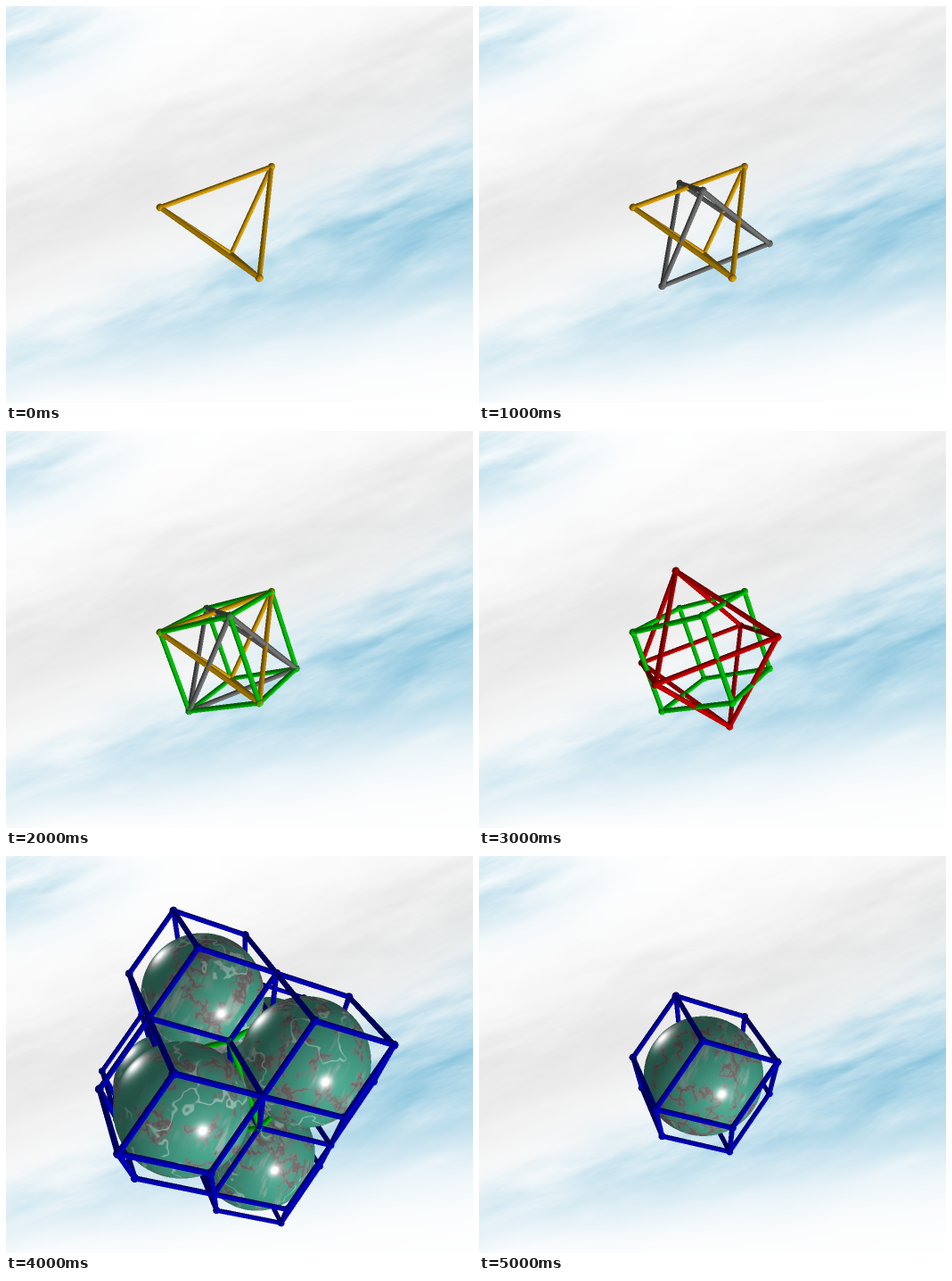
Recreate the animation shown at these times as an HTML page with a canvas. Size 524 px wide and 445 px high, loop 5.5 s.

```html
<!DOCTYPE html>
<html lang="en">
<head>
<meta charset="utf-8">
<title>Packed spheres and polyhedra</title>
<style>
html, body { margin: 0; width: 100%; height: 100%; overflow: hidden; background: #fff; }
canvas { display: block; }
</style>
</head>
<body>
<canvas id="stage" width="524" height="445"></canvas>
<script>
const W = 524, H = 445, SS = 2, SLOT = 500;
const ctx = document.getElementById('stage').getContext('2d');
const clamp = v => Math.max(0, Math.min(1, v));
const smooth = (a, b, v) => { v = clamp((v - a) / (b - a)); return v * v * (3 - 2 * v); };
const mix = (a, b, t) => a.map((v, i) => v + (b[i] - v) * t);
const dot = (a, b) => a[0] * b[0] + a[1] * b[1] + a[2] * b[2];

// Smooth 3D value noise in 0..1
function hash(x, y, z) {
  let h = Math.imul(x, 374761393) ^ Math.imul(y, 668265263) ^ Math.imul(z, 1440662683);
  h = Math.imul(h ^ (h >>> 13), 1274126177);
  return ((h ^ (h >>> 16)) >>> 0) / 4294967296;
}
function noise(x, y, z) {
  const i = Math.floor(x), j = Math.floor(y), k = Math.floor(z);
  const ease = t => t * t * (3 - 2 * t), lerp = (a, b, t) => a + (b - a) * t;
  const u = ease(x - i), v = ease(y - j), w = ease(z - k);
  const row = (b, c) => lerp(hash(i, b, c), hash(i + 1, b, c), u);
  return lerp(lerp(row(j, k), row(j + 1, k), v), lerp(row(j, k + 1), row(j + 1, k + 1), v), w);
}
function fbm(x, y, z, octaves) {
  let sum = 0, amp = 1, total = 0;
  for (let o = 0; o < octaves; o++) {
    sum += amp * noise(x, y, z);
    total += amp;
    amp *= 0.55;
    x = x * 2.03 + 7; y = y * 2.03 + 3; z = z * 2.03 + 5;
  }
  return sum / total;
}

function layer(w, h) {
  const canvas = document.createElement('canvas');
  canvas.width = w;
  canvas.height = h;
  const c = canvas.getContext('2d');
  return { canvas, c, image: c.createImageData(w, h) };
}

// Streaky clouds with a blue gap at lower right and a small one at top left
function makeSky() {
  const { canvas, c, image } = layer(W, H);
  for (let y = 0, i = 0; y < H; y++) for (let x = 0; x < W; x++, i += 4) {
    const p = 0.93 * x - 0.37 * y, q = 0.37 * x + 0.93 * y;
    const bend = fbm(p / 120, q / 60, 4, 3) - 0.5;
    const wisp = fbm(p / 65, q / 15 + bend, 9, 5) - 0.5;
    const yy = y + bend * 22 + wisp * 32;
    const t = (yy - (412 - 0.34 * x)) / (36 + 0.125 * x);
    const band = Math.exp(-t * t * 1.2) * (0.25 + 0.55 * x / W) * (1 + wisp * 1.3);
    const corner = 0.42 * Math.exp(-((x / 95) ** 2) - ((yy - 45 + 0.15 * x) / 42) ** 2) * (1 + wisp * 2);
    const g = (yy - (255 - 0.38 * x)) / 85;
    const grey = Math.exp(-g * g) * 20 * (1 + wisp * 0.8);
    const rgb = mix([254 - grey, 254 - grey, 254 - grey], [138, 196, 221], clamp(Math.max(band, corner)));
    image.data.set([...rgb, 255], i);
  }
  c.putImageData(image, 0, 0);
  return canvas;
}

// Camera: screen x, y in pixels per unit, z in units towards the viewer
const AXES = [[-14.9, -43.7, 0.19], [38.2, -7.4, 0.56], [-22.9, 15.9, 0.806]];
const UNIT = 47.2, DIST = 12.7, CENTRE = [251.7, 246.5], DRIFT = [-10, 5];
const LIGHT = [0.55, 0.55, 0.63], SHINE = [0.305, 0.305, 0.902], GLEAM = [-0.69, -0.64, 0.34];
const view = p => [0, 1, 2].map(i => p[0] * AXES[0][i] + p[1] * AXES[1][i] + p[2] * AXES[2][i]);
const diffuse = n => 0.45 + 0.6 * Math.max(0, dot(n, LIGHT));

function marble(n, seed) {
  const x = n[0] + seed * 5.3, y = n[1] + seed * 2.7, z = n[2] + seed * 3.1;
  const ridge = (f, o) => 1 - Math.abs(2 * fbm(x * f, y * f, z * f + o, 4) - 1);
  const patch = smooth(0.42, 0.58, fbm(x * 3.5, y * 3.5, z * 3.5 + 40, 2));
  const spot = ridge(4.2, 0);
  const haze = smooth(0.46, 0.72, fbm(x * 10 + y * 4, y * 2.5, z * 3 + 70, 4)) *
    smooth(0.4, 0.65, noise(x * 2.2, y * 2.2, z * 2.2 + 60));
  const vein = smooth(0.965, 0.99, ridge(1.3, 90)) * smooth(0.5, 0.58, noise(x * 1.6, y * 1.6, z * 1.6 + 20));
  let rgb = mix([66, 156, 132], [158, 172, 166], haze * 0.75);
  rgb = mix(rgb, [128, 128, 124], smooth(0.74, 0.9, spot) * patch * 0.8);
  rgb = mix(rgb, [112, 97, 99], smooth(0.89, 0.97, spot) * patch * 0.8);
  rgb = mix(rgb, [170, 208, 194], vein * 0.8);
  const d = 0.12 + 0.9 * diffuse(n);
  const s = Math.max(0, dot(n, SHINE)), g = Math.max(0, dot(n, GLEAM));
  const white = clamp(1.1 * s ** 190 + 0.16 * s ** 22 + g ** 42);
  return mix(rgb.map(v => v * d), [255, 255, 255], white);
}

function makeScene(build) {
  const w = W * SS, h = H * SS;
  const { canvas, c, image } = layer(w, h);
  const depth = new Float32Array(w * h).fill(-99);

  function ball(p, r, shade) {
    const [vx, vy, vz] = view(p), k = DIST / (DIST - vz);
    // Perspective widens a sphere's outline and pushes it outwards
    const swell = (r * k / DIST) ** 2, out = k * (1 + swell);
    const cx = SS * (CENTRE[0] + DRIFT[0] * (k - 1) + vx * out);
    const cy = SS * (CENTRE[1] + DRIFT[1] * (k - 1) + vy * out);
    const R = SS * UNIT * r * k * (1 + swell / 2);
    for (let y = Math.ceil(cy - R); y <= cy + R; y++) for (let x = Math.ceil(cx - R); x <= cx + R; x++) {
      const nx = (x - cx) / R, ny = (y - cy) / R, rest = 1 - nx * nx - ny * ny;
      if (rest < 0 || x < 0 || y < 0 || x >= w || y >= h) continue;
      const nz = Math.sqrt(rest), z = vz + r * nz, i = y * w + x;
      if (z < depth[i]) continue;
      depth[i] = z;
      const rgb = shade([nx, ny, nz]);
      image.data.set([rgb[0], rgb[1], rgb[2], 255], i * 4);
    }
  }
  // Joins every pair of points whose squared distance is d2
  function frame(points, d2, color) {
    const shade = n => { const d = diffuse(n); return color.map(v => v * d); };
    points.forEach((a, i) => {
      ball(a, 0.088, shade);
      for (const b of points.slice(i + 1)) {
        if (a.reduce((s, v, j) => s + (v - b[j]) ** 2, 0) !== d2) continue;
        for (let t = 0; t <= 160; t++) ball(mix(a, b, t / 160), 0.058, shade);
      }
    });
  }
  const spheres = (points, seed) =>
    points.forEach((p, i) => ball(p, Math.SQRT2, n => marble(n, seed + i)));

  build(frame, spheres);
  c.putImageData(image, 0, 0);
  return canvas;
}

const cube = [];
for (const a of [1, -1]) for (const b of [1, -1]) for (const c of [1, -1]) cube.push([a, b, c]);
const even = cube.filter(p => p[0] * p[1] * p[2] > 0);
const odd = cube.filter(p => p[0] * p[1] * p[2] < 0);
const octa = [0, 1, 2].flatMap(i => [2, -2].map(v => [0, 1, 2].map(j => i === j ? v : 0)));
const cell = o => [...cube, ...octa].map(p => p.map((v, i) => v + o[i]));

const gold = f => f(odd, 8, [215, 158, 5]);
const grey = f => f(even, 8, [112, 112, 112]);
const green = f => f(cube, 4, [0, 205, 10]);
const red = f => f(octa, 8, [195, 0, 0]);
const blue = (f, o) => f(cell(o), 3, [0, 0, 192]);
const pair = f => { gold(f); grey(f); };
const dual = f => { green(f); red(f); };
const origin = [0, 0, 0];

const steps = [
  gold,
  (f, s) => { gold(f); s(odd, 1); },
  pair,
  (f, s) => { pair(f); s(even, 5); },
  f => { pair(f); green(f); },
  green,
  dual,
  (f, s) => { dual(f); s(octa, 9); },
  (f, s) => { dual(f); s(octa, 9); octa.forEach(o => blue(f, o)); },
  f => { dual(f); blue(f, origin); },
  (f, s) => { blue(f, origin); s([origin], 16); }
];

const sky = makeSky(), scenes = [];
let shown = -1;
ctx.imageSmoothingQuality = 'high';

function draw() {
  const step = Math.floor(performance.now() / SLOT) % steps.length;
  if (step !== shown) {
    scenes[step] ||= makeScene(steps[step]);
    ctx.drawImage(sky, 0, 0);
    ctx.drawImage(scenes[step], 0, 0, W, H);
    shown = step;
  }
  requestAnimationFrame(draw);
}
draw();
</script>
</body>
</html>
```
